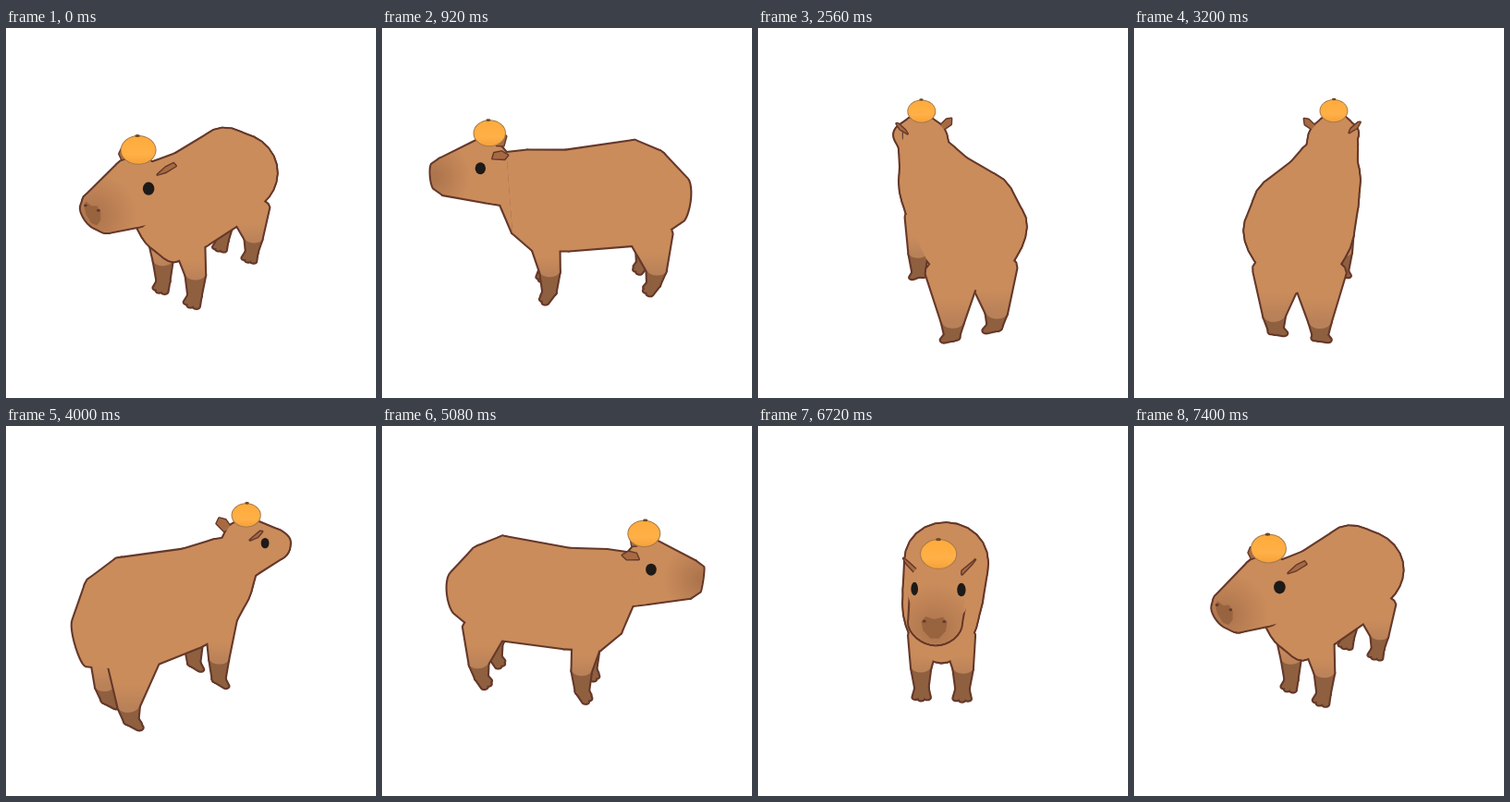
An HTML page with a canvas that plays this animation: 400 px wide and 400 px high, repeating every 7.44 s.

```html
<!DOCTYPE html>
<html lang="en">
<head>
<meta charset="utf-8">
<title>Turning capybara</title>
<style>
  html, body { margin: 0; width: 100%; height: 100%; overflow: hidden; background: #fff; }
  canvas { display: block; width: 400px; height: 400px; }
</style>
</head>
<body>
<canvas id="stage" width="400" height="400"></canvas>
<script>
const ctx = document.getElementById('stage').getContext('2d');
const LOOP = 7440, STEP = 40, FRONT = 6660;
const TILT_SIN = 0.572, TILT_COS = 0.82, DIST = 500;
const FUR = '#ca8c5b', LINE = '#65382a', SOCK = '#8f603f', EAR = '#a66a43';

// Body cross-sections: forward position, centre height, half height, half width
const SECTIONS = [
  [-117, 95, 22, 14], [-90, 102, 41, 41], [-65, 103, 51, 43], [0, 99, 49, 37],
  [35, 101, 49, 33], [54, 111, 38, 27], [63, 132, 29, 25], [77, 134, 28, 21],
  [113, 131, 15, 18.5], [120, 132, 10, 13]
];
const SNOUT = 7;

// Legs: foot position, then hip position, radius and height, and sock height
const PAIRS = [
  { u: 25, hipU: 25, hipV: 16, hip: 15, top: 76, sock: 36 },
  { u: -85, hipU: -78, hipV: 17, hip: 23, top: 72, sock: 28 }
];
const FOOT_V = 21;

let sin = 0, cos = 1;

const depth = (u, v) => u * cos - v * sin;

// Forward, sideways, height -> screen x, y and scale
function project(u, v, h) {
  const x = u * sin + v * cos, z = depth(u, v);
  const k = DIST / (DIST - z * TILT_COS - h * TILT_SIN);
  return [200 + k * x, 281 - k * (h * TILT_COS - z * TILT_SIN), k];
}

function loop(point, n = 28) {
  return Array.from({ length: n }, (_, i) => {
    const a = i / n * Math.PI * 2;
    return project(...point(Math.cos(a), Math.sin(a)));
  });
}

// Egg-shaped, fuller towards the back
const upright = ([u, h, H, w]) => loop((c, s) => [u, w * c * (1 + 0.15 * s), h + H * s]);
const flat = (u, v, h, r) => loop((c, s) => [u + r * c, v + r * s, h], 18);

function hull(points) {
  const sorted = [...points].sort((a, b) => a[0] - b[0] || a[1] - b[1]);
  const half = list => {
    const out = [];
    for (const p of list) {
      while (out.length > 1) {
        const [a, b] = out.slice(-2);
        if ((b[0] - a[0]) * (p[1] - a[1]) - (b[1] - a[1]) * (p[0] - a[0]) > 0) break;
        out.pop();
      }
      out.push(p);
    }
    return out.slice(0, -1);
  };
  return [...half(sorted), ...half(sorted.reverse())];
}

function path(points) {
  const p = new Path2D();
  points.forEach(([x, y], i) => i ? p.lineTo(x, y) : p.moveTo(x, y));
  p.closePath();
  return p;
}

const skin = (a, b) => path(hull([...a, ...b]));

function stroke(shapes, width = 4.2) {
  ctx.strokeStyle = LINE;
  ctx.lineWidth = width;
  shapes.forEach(s => ctx.stroke(s));
}

function fill(shapes, color) {
  ctx.fillStyle = color;
  shapes.forEach(s => ctx.fill(s));
}

function oval(x, y, rx, ry, color) {
  ctx.beginPath();
  ctx.ellipse(x, y, rx, ry, 0, 0, Math.PI * 2);
  ctx.fillStyle = color;
  ctx.fill();
}

function buildLeg({ u, hipU, hipV, hip, top, sock }, side) {
  const v = FOOT_V * side;
  const upper = flat(hipU, hipV * side, top, hip);
  const knee = flat(u - 5, v, sock, 9.5);
  const ankle = flat(u - 4, v, 11, 6.3);
  const toes = [-6, 0, 6].map(d =>
    skin(ankle, flat(u + (d ? 1 : 3), v + d, 3, 2.8)));
  const z = depth(u, v);
  return {
    z,
    near: -v * sin > 6 || z > 20,
    thigh: skin(upper, knee),
    foot: [skin(knee, ankle), ...toes],
    from: project(u, v, top - 22)[1],
    to: project(u, v, sock - 4)[1]
  };
}

function drawLeg(leg) {
  stroke([leg.thigh, ...leg.foot]);
  fill(leg.foot, SOCK);
  const g = ctx.createLinearGradient(0, leg.from, 0, leg.to);
  g.addColorStop(0, FUR);
  g.addColorStop(1, '#b98159');
  fill([leg.thigh], g);
}

function drawEar(side) {
  const ear = path([
    [66, 18, 152], [64, 25, 159], [58, 28, 161], [53, 26, 157], [56, 18, 151]
  ].map(([u, v, h]) => project(u, v * side, h)));
  stroke([ear], 2.8);
  fill([ear], EAR);
}

function drawFace(snout) {
  if (cos > -0.35) {
    ctx.save();
    const clip = new Path2D();
    snout.forEach(s => clip.addPath(s));
    ctx.clip(clip);
    const [x, y, k] = project(120, 0, 132);
    const g = ctx.createRadialGradient(x, y, 4, x, y, 33 * k);
    g.addColorStop(0, 'rgba(150,98,66,.55)');
    g.addColorStop(1, 'rgba(150,98,66,0)');
    ctx.fillStyle = g;
    ctx.fillRect(0, 0, 400, 400);
    if (cos > 0.3) {
      const nose = path([
        [-9, 138], [-6, 142], [0, 140], [6, 142], [9, 138], [8, 131], [3, 125], [-3, 125], [-8, 131]
      ].map(([v, h]) => project(120, v, h)));
      fill([nose], '#98633f');
      for (const v of [-7, 7]) {
        const [nx, ny, nk] = project(120, v, 138.5);
        oval(nx, ny, 1.3 * nk, nk, '#64392a');
      }
    }
    ctx.restore();
  }
  for (const side of [-1, 1]) {
    const facing = depth(0.35, 0.9 * side) * TILT_COS + 0.086;
    if (facing <= 0) continue;
    const [x, y, k] = project(77, 18 * side, 144);
    oval(x, y, 4.5 * k * Math.min(1, facing * 1.8), 5.1 * k, '#1d1a18');
  }
}

function drawOrange() {
  const [x, y, k] = project(67, 0, 168);
  const rx = 13.6 * k, ry = 11 * k;
  oval(x, y, rx + 0.6, ry + 0.6, '#a5794a');
  const g = ctx.createLinearGradient(0, y - ry, 0, y + ry);
  g.addColorStop(0, '#ffab3b');
  g.addColorStop(0.65, '#ffb047');
  g.addColorStop(1, '#f7a03a');
  oval(x, y, rx - 0.4, ry - 0.4, g);
  const [sx, sy, sk] = project(67, 0, 179);
  oval(sx, sy, 2 * sk, 1.1 * sk, '#6b4a28');
}

function draw(t) {
  const angle = (FRONT - t) / LOOP * Math.PI * 2;
  sin = Math.sin(angle);
  cos = Math.cos(angle);
  ctx.fillStyle = '#fff';
  ctx.fillRect(0, 0, 400, 400);
  ctx.lineJoin = 'round';

  const rings = SECTIONS.map(upright);
  const skins = rings.slice(1).map((r, i) => skin(rings[i], r));
  const torso = skins.slice(0, SNOUT), snout = skins.slice(SNOUT);
  const legs = PAIRS.flatMap(p => [buildLeg(p, 1), buildLeg(p, -1)])
    .sort((a, b) => a.z - b.z);
  const away = cos < -0.2;
  const farEar = sin > 0 ? 1 : -1;

  legs.filter(l => !l.near).forEach(drawLeg);
  if (away) stroke(snout);
  stroke(torso);
  legs.filter(l => l.near).forEach(drawLeg);
  fill(torso, FUR);

  drawEar(farEar);
  if (!away) stroke(snout);
  fill([skins[SNOUT - 1], ...snout], FUR);
  drawFace(snout);
  drawEar(-farEar);
  drawOrange();
}

function tick() {
  const t = performance.now() % LOOP;
  draw(Math.floor(t / STEP) * STEP);
  requestAnimationFrame(tick);
}
tick();
</script>
</body>
</html>
```
